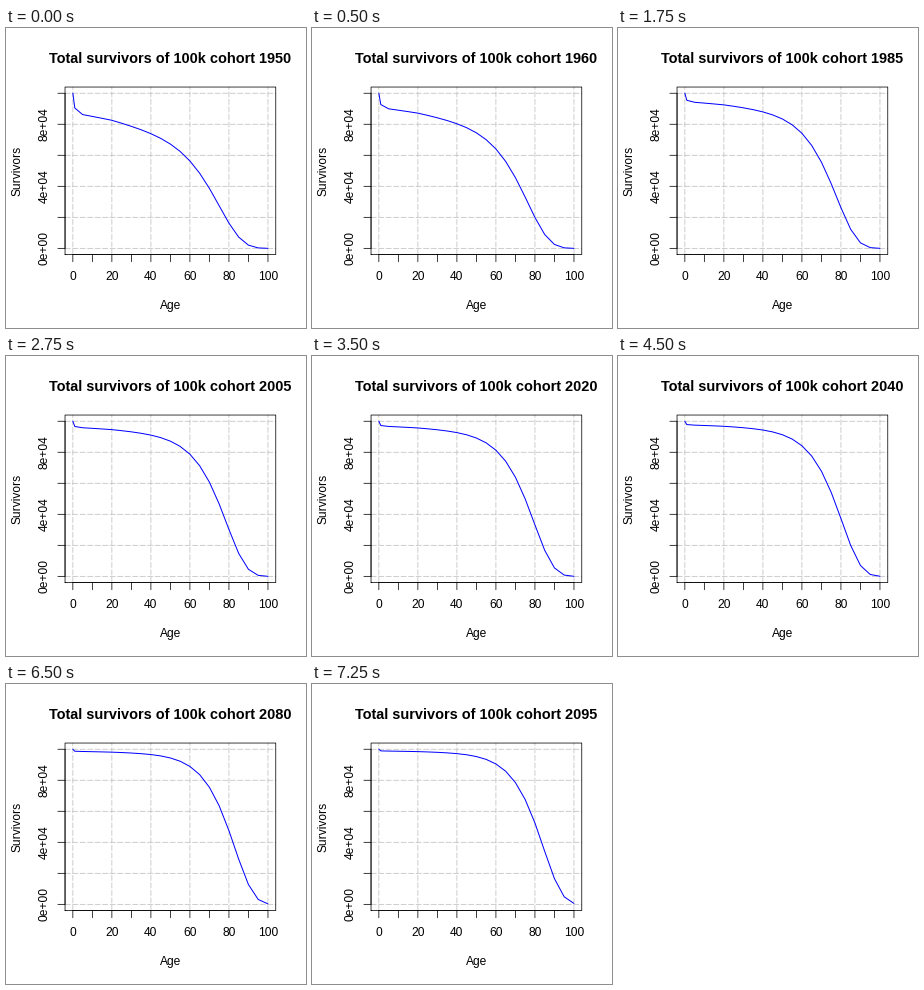
Write a matplotlib script that moves like this. It is 300 by 300 pixels and loops after 7.5 s.

```python
import numpy as np
import matplotlib.pyplot as plt
from matplotlib.animation import FuncAnimation

SIZE = 300
LINE = 14.4                      # height of one margin line in pixels
LEFT, RIGHT = 4.1 * LINE, SIZE - 2.1 * LINE
TOP, BOTTOM = 4.1 * LINE, SIZE - 5.1 * LINE
PAD = 0.04 / 1.08                # gap between the data and the box
THIN = 0.75

START, STEP, COUNT = 1950, 5, 30
AGES = np.array([0, 1, *range(5, 101, 5)], dtype=float)

plt.rcParams.update({
    "font.family": "Liberation Sans",
    "text.hinting": "force_autohint",
    "text.hinting_factor": 8,
})


def survivors(year):
    """Share alive at each age: infant, child, background and old-age risk."""
    t = year - START
    u = t / (STEP * (COUNT - 1))
    level = np.exp(-0.0128 * t - 0.386 * (1 - np.exp(-t / 20)))

    infant = 0.0998 * level * np.clip(AGES, 0, 1)
    child = 0.0475 * level ** 1.65 * np.clip((AGES - 1) / 4, 0, 1)
    exposed = np.interp(AGES, [5, 20, 100], [0, 10, 90])
    background = 0.0039 * level ** 1.2 * exposed

    # Gompertz risk, scaled by the toll between ages 70 and 80
    rate = 0.0896 + 0.0177 * (1 - level)
    toll = 0.827 * np.exp(-0.48 * u - 0.245 * u ** 4)
    growth = np.exp(rate * (AGES - 75)) - np.exp(-75 * rate)
    old = toll * growth / (2 * np.sinh(5 * rate))
    return np.exp(-(infant + child + background + old))


def x_pos(age):
    return LEFT + (RIGHT - LEFT) * (PAD + np.asarray(age) / 108)


def y_pos(share):
    return BOTTOM - (BOTTOM - TOP) * (PAD + np.asarray(share) / 1.08)


fig = plt.figure(figsize=(SIZE / 72, SIZE / 72), dpi=72, facecolor="white")
ax = fig.add_axes([0, 0, 1, 1])
ax.set_xlim(0, SIZE)
ax.set_ylim(SIZE, 0)
ax.axis("off")


def rule(x, y, **style):
    style = {"color": "black", "solid_capstyle": "round", **style}
    ax.plot(x, y, lw=THIN, snap=False, **style)


def label(x, y, text, size=12, **style):
    return ax.text(x, y, text, fontsize=size, ha="center", va="baseline",
                   rotation_mode="anchor", **style)


grid = dict(color="#bebebe", dashes=(7, 3), dash_capstyle="round", zorder=1)
for age in range(0, 101, 10):
    x = x_pos(age)
    rule([x, x], [BOTTOM, BOTTOM + 7.2])
    if age % 20 == 0:
        rule([x, x], [BOTTOM, TOP], **grid)
        label(x, BOTTOM + 1.8 * LINE, str(age))

for k in range(0, 11, 2):
    y = y_pos(k / 10)
    rule([LEFT - 7.2, LEFT], [y, y])
    rule([LEFT, RIGHT], [y, y], **grid)
    if k % 4 == 0:
        text = f"{k}e+04" if k else "0e+00"
        label(LEFT - 1.2 * LINE, y, text, rotation=90)

# Axis lines, then the box around the plot
rule(x_pos([0, 100]), [BOTTOM, BOTTOM])
rule([LEFT, LEFT], y_pos([0, 1]))
rule([LEFT, RIGHT, RIGHT, LEFT, LEFT], [BOTTOM, BOTTOM, TOP, TOP, BOTTOM],
     solid_joinstyle="round")

mid_x, mid_y = (LEFT + RIGHT) / 2, (TOP + BOTTOM) / 2
label(mid_x, BOTTOM + 3.8 * LINE, "Age")
label(LEFT - 3.12 * LINE, mid_y, "Survivors", rotation=90)
title = label(mid_x, 35, "", size=14.5, weight="bold")
curve, = ax.plot([], [], color="blue", lw=1, snap=False, zorder=3,
                 solid_joinstyle="round", solid_capstyle="round")


def draw(frame):
    year = START + STEP * frame
    title.set_text(f"Total survivors of 100k cohort {year}")
    curve.set_data(x_pos(AGES), y_pos(survivors(year)))
    return title, curve


anim = FuncAnimation(fig, draw, frames=COUNT, interval=250, repeat=True)
plt.show()
```
